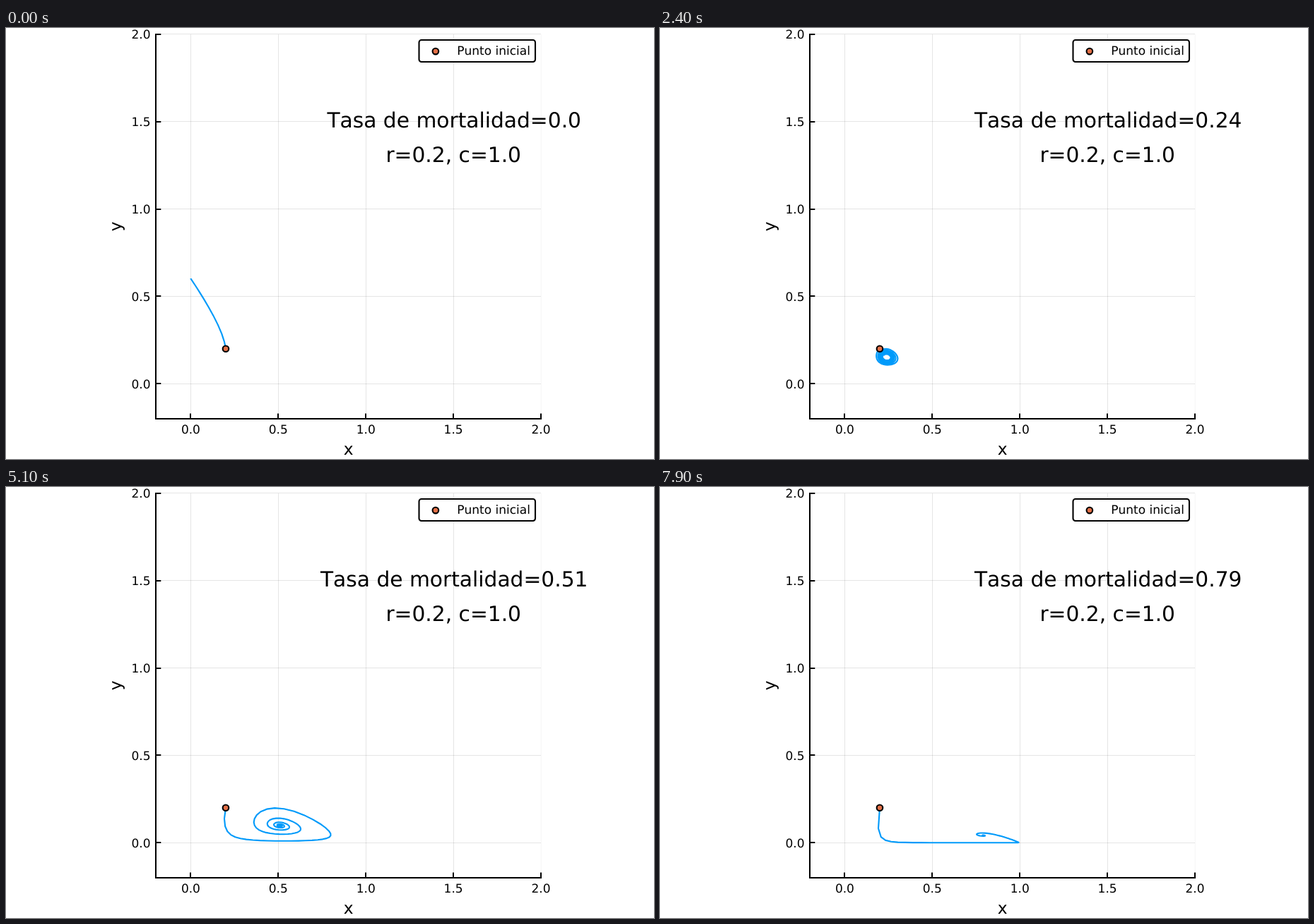
An HTML page that plays this animation: 917x611 px, repeating every 8 s.

```html
<!DOCTYPE html>
<html lang="es">
<head>
<meta charset="utf-8">
<title>Tasa de mortalidad</title>
<style>
  html, body { margin: 0; width: 100%; height: 100%; overflow: hidden; background: #fff; }
  svg { display: block; }
  text {
    font: 17px "DejaVu Sans", sans-serif; font-kerning: none;
    text-anchor: middle; text-rendering: geometricPrecision;
  }
  .big { font-size: 29.7px; }
  .guide { font-size: 23.35px; }
  .end { text-anchor: end; }
  .legend { text-anchor: start; }
  .grid { stroke: #000; stroke-opacity: .1; stroke-width: 1; }
  .axis { stroke: #000; stroke-width: 2; stroke-linecap: square; fill: none; }
  .tick { stroke: #000; stroke-width: 2; }
  .dot { fill: #e26f46; stroke: #000; stroke-width: 2.1; }
  #orbit { fill: none; stroke: #009afa; stroke-width: 2.12; stroke-linejoin: round; }
</style>
</head>
<body>
<svg width="917" height="611" viewBox="0 0 917 611">
  <g id="frame"></g>
  <path class="axis" d="M212 9V554H757"/>
  <path id="orbit"/>
  <circle class="dot" id="start" r="4.3"/>
  <text class="guide" x="484.6" y="604.5">x</text>
  <text class="guide" transform="translate(162.5 281.4) rotate(-90)">y</text>
  <rect x="584.5" y="17" width="164.5" height="31" rx="3.4" fill="#fff" stroke="#000" stroke-width="2.1"/>
  <circle class="dot" cx="607.9" cy="33.1" r="4.3"/>
  <text class="legend" x="638.2" y="38">Punto inicial</text>
  <text class="big" id="rate" x="634.2" y="141"></text>
  <text class="big" x="633.2" y="190.3">r=0.2, c=1.0</text>
</svg>
<script>
const $ = id => document.getElementById(id);
const scale = 247.8;
const px = x => 261.4 + scale * x;
const py = y => 504.3 - scale * y;
const crisp = v => Math.floor(v) + 0.5;
const r = 0.2, c = 1, steps = 200, start = [0.2, 0.2];

const line = (cls, x1, y1, x2, y2) =>
  `<line class="${cls}" x1="${x1}" y1="${y1}" x2="${x2}" y2="${y2}"/>`;

let parts = "";
for (let v = 0; v <= 2; v += 0.5) {
  const x = px(v), y = py(v), label = v.toFixed(1);
  const tx = Math.round(x), ty = Math.round(y);
  if (v < 2) parts += line("grid", crisp(x), 9, crisp(x), 554);
  parts += line("grid", 212, crisp(y), 757, crisp(y))
    + line("tick", tx, 554, tx, 546.6) + line("tick", 212, ty, 219.3, ty)
    + `<text x="${x}" y="575">${label}</text>`
    + `<text class="end" x="204.5" y="${y + 6.5}">${label}</text>`;
}
parts += '<line class="grid" x1="757.3" y1="9" x2="757.3" y2="554" style="stroke-opacity:.04"/>';
$("frame").innerHTML = parts;
$("start").setAttribute("cx", px(start[0]));
$("start").setAttribute("cy", py(start[1]));

// Predator-prey model with logistic prey, iterated with unit time steps
function orbit(death) {
  let [x, y] = start;
  const points = [];
  for (let i = 0; i <= steps; i++) {
    points.push(px(x).toFixed(2) + " " + py(y).toFixed(2));
    [x, y] = [x + r * x * (1 - x) - c * x * y, y + c * x * y - death * y];
  }
  return "M" + points.join("L");
}

let shown = -1;
function draw() {
  const n = Math.floor(performance.now() % 8000 / 100);
  if (n !== shown) {
    shown = n;
    const death = n / 100;
    $("orbit").setAttribute("d", orbit(death));
    $("rate").textContent = "Tasa de mortalidad=" + (n % 10 ? death : death.toFixed(1));
  }
  requestAnimationFrame(draw);
}
draw();
</script>
</body>
</html>
```
